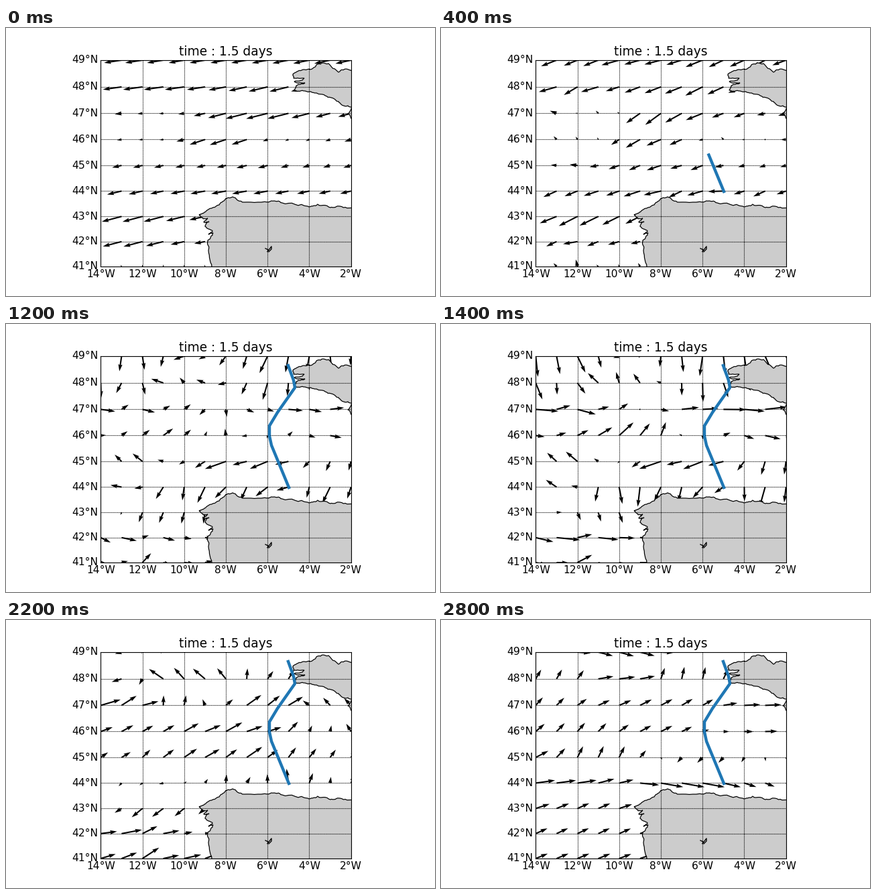
A matplotlib script that plays this animation: 640x400 px, repeating every 3000 ms.

```python
import numpy as np
import matplotlib.pyplot as plt
from matplotlib.animation import FuncAnimation

plt.rcParams["font.family"] = "DejaVu Sans"
plt.rcParams["font.size"] = 14

W, H, DPI = 640, 400, 80
LEFT, RIGHT, TOP, BOTTOM = 141.3, 514.7, 48, 356
STEPS = 15


def miller(lat):
    return 1.25 * np.log(np.tan(np.pi / 4 + 0.4 * np.radians(lat)))


def lat_y(lat):
    return BOTTOM + (TOP - BOTTOM) * (miller(lat) - miller(41)) / (miller(49) - miller(41))


def lon_x(lon):
    return LEFT + (RIGHT - LEFT) * (lon + 14) / 12


# Weather stations per key step: degrees east of 14°W, latitude, wind right, wind down.
STATIONS = {
    0: [(5, 49, -23, 4), (3, 48, -29, 4), (8, 47, -32, 8), (3, 46.5, -4, 0),
        (6, 46, -24, 8), (9, 46, -5, 2), (5, 45, -13, 3), (6, 44, -22, 4),
        (2, 42.5, -30, 8), (3, 41, 0, -3)],
    4: [(5, 49, -24, 9), (1, 48, -20, 16), (8, 48, -21, 15), (3, 47, 2, -8),
        (6, 47, -19, 20), (2, 46, 1, -12), (5, 46, -17, 20), (9, 46.3, -1, -6),
        (6, 44.5, -25, 8), (3, 43, -20, 16), (3, 41, -2, -8)],
    7: [(1, 48.5, 6, 27), (4, 48, -9, -17), (8, 48.5, 2, 26), (1, 47, 28, 1),
        (9, 47, 30, -4), (4, 46, 18, -15), (1, 44.5, -17, -14), (4, 44, 0, 26),
        (7, 45, -28, 8), (11, 44, -7, 23), (3, 42, 26, 0)],
    11: [(1, 48, -11, 8), (4, 48, -18, -17), (1, 47, 27, -10), (4, 47, 1, -15),
         (8, 47, 22, -16), (11, 47, -13, -11), (6, 46, 26, -7), (6, 45, 20, -14),
         (8, 44, 0, -14), (3, 43, -12, 10), (2, 41.5, 27, -9)],
    14: [(4, 49, 22, 6), (1, 48, 8, -14), (4, 48, 24, -3), (7, 48, 4, -18),
         (6, 46.5, 18, -9), (11, 47, 24, -1), (3, 45, 8, -17), (8, 45, -8, 8),
         (1, 44, 29, -4), (7, 44, 34, 6), (2, 42.5, 17, -8)],
}

# One arrow per degree, over the sea only.
sea = np.array([(e, lat) for lat in range(49, 40, -1) for e in range(13)
                if not (lat < 44 and e > 5) and not (lat == 48 and e > 10)])
gusts = np.random.default_rng(4).normal(0, 4, (2, len(sea)))


def blend(stations):
    """Inverse-distance mean; winds vary faster along a meridian."""
    s = np.array(stations)
    d = (sea[:, None] - s[None, :, :2]) / (2.2, 0.8)
    w = ((d ** 2).sum(axis=2) + 0.05) ** -2
    return (w @ s[:, 2:] / w.sum(axis=1, keepdims=True)).T


keys = list(STATIONS)
fields = [blend(s) for s in STATIONS.values()]


def wind(step):
    k = min(np.searchsorted(keys, step, side="right"), len(keys) - 1)
    t = (step - keys[k - 1]) / (keys[k] - keys[k - 1])
    calm = fields[k - 1] * (1 - t) + fields[k] * t
    return calm + gusts * np.sin(np.pi * step / (STEPS - 1))


route = np.array([(422, 244), (396, 181), (393, 167), (393, 152),
                  (405, 132), (431, 95), (429, 84), (421, 62)])
miles = np.append(0, np.cumsum(np.hypot(*np.diff(route, axis=0).T)))
LOG = [0, 27, 59, 112, 166, miles[-1]]


def sailed(step):
    done = LOG[min(step, len(LOG) - 1)]
    s = np.append(miles[miles < done], done)
    return [np.interp(s, miles, c) for c in route.T]


north = [(520, 65), (511, 62), (496, 66), (481, 53), (465, 54), (458, 60), (441, 63),
         (428, 69), (429, 75), (445, 75), (430, 80), (446, 82), (433, 86), (430, 93),
         (446, 94), (463, 97), (476, 101), (493, 109), (504, 116), (516, 118),
         (510, 128), (520, 139)]
south = [(520, 270), (498, 266), (484, 268), (465, 263), (450, 266), (412, 261),
         (396, 258), (355, 260), (338, 252), (330, 254), (318, 264), (300, 272),
         (288, 279), (294, 285), (301, 284), (295, 290), (303, 289), (297, 296),
         (308, 303), (302, 308), (309, 306), (301, 317), (302, 332), (309, 360)]
lake = [(387, 329), (391, 331), (390, 334), (396, 326), (396, 330), (392, 334)]


def rough(points, seed, levels=3):
    """Fractal coast: shift each midpoint sideways, again and again."""
    rng = np.random.default_rng(seed)
    p = np.array(points, float)
    for _ in range(levels):
        dx, dy = np.diff(p, axis=0).T
        push = rng.uniform(-0.16, 0.16, len(dx)) * np.minimum(1, 10 / np.hypot(dx, dy))
        mid = (p[1:] + p[:-1]) / 2 + (push * (-dy, dx)).T
        p = np.insert(p, np.arange(1, len(p)), mid, axis=0)
    return p


fig = plt.figure(figsize=(W / DPI, H / DPI), dpi=DPI)
ax = fig.add_axes([LEFT / W, 1 - BOTTOM / H, (RIGHT - LEFT) / W, (BOTTOM - TOP) / H])
ax.set(xlim=(LEFT, RIGHT), ylim=(BOTTOM, TOP), xticks=[], yticks=[])
ax.set_title("time : 1.5 days")
for side in ax.spines.values():
    side.set_linewidth(1)

arrows = ax.quiver(lon_x(sea[:, 0] - 14), lat_y(sea[:, 1]), *wind(0), angles="xy",
                   scale_units="xy", scale=1, units="dots", width=2.07, zorder=1)
shores = [rough(north, 1), np.append(rough(south, 2), [(520, 360)], axis=0)]
lands = [ax.fill(*shore.T, fc="#cccccc", ec="k", lw=1.1, zorder=2)[0] for shore in shores]
ax.plot(*np.transpose(lake), color="k", lw=1.2, zorder=2.1)

grid = dict(color="k", lw=1, dashes=(1, 1), zorder=2.5)
for lat in range(41, 50):
    ax.plot([LEFT, RIGHT], [lat_y(lat)] * 2, **grid)
    ax.text(LEFT - 3.7, lat_y(lat), f"{lat}°N", ha="right", va="center")
for lon in range(-14, 0, 2):
    ax.plot([lon_x(lon)] * 2, [BOTTOM, TOP], **grid)
    ax.text(lon_x(lon), BOTTOM + 4, f"{-lon}°W", ha="center", va="top")

track, = ax.plot([], [], lw=4, zorder=4)


def update(step):
    dark = step == 1
    paper = "#4f4f4f" if dark else "white"
    fig.set_facecolor(paper)
    ax.set_facecolor(paper)
    for land in lands:
        land.set_facecolor("#3f3f3f" if dark else "#cccccc")
    track.set_color("#202020" if dark else "#1f77b4")
    track.set_data(*(sailed(step) if step else ([], [])))
    arrows.set_UVC(*wind(step))
    return [arrows, track, *lands]


anim = FuncAnimation(fig, update, frames=STEPS, init_func=lambda: update(0),
                     interval=200, repeat=True, repeat_delay=0, blit=False)
plt.show()
```
